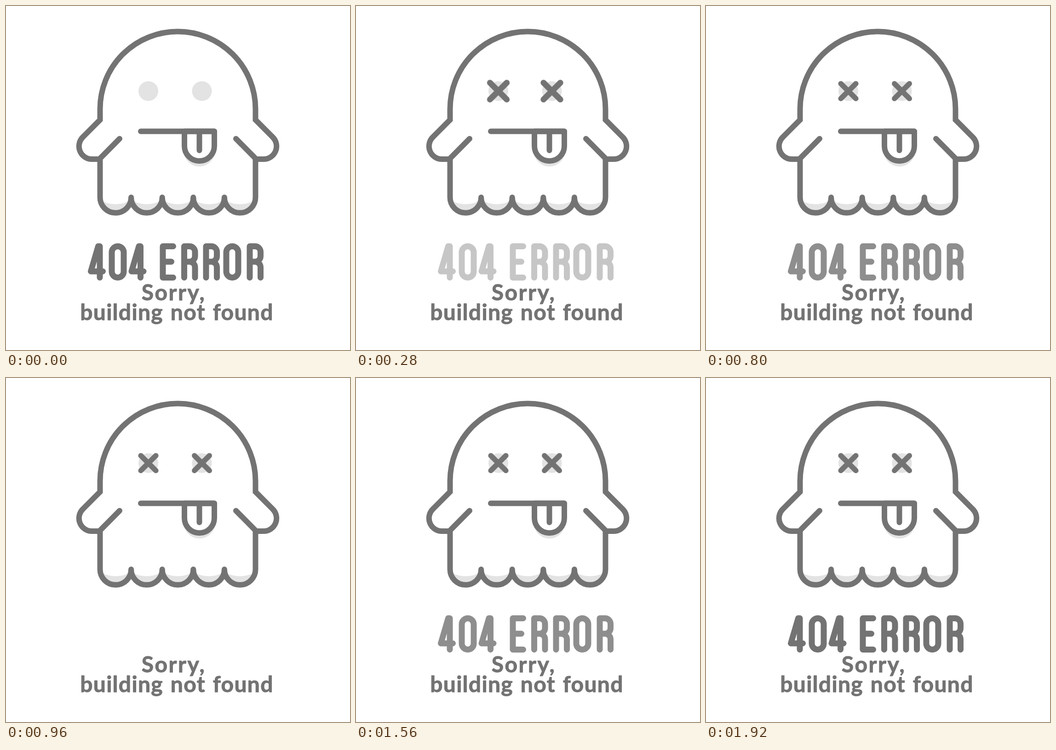
These frames come from a looping animation (748x748 px, 2000 ms). An HTML page:

```html
<!DOCTYPE html>
<html lang="en">
<head>
<meta charset="utf-8">
<title>404 Error</title>
<style>
  html, body { margin: 0; width: 100%; height: 100%; overflow: hidden; background: #fff; }
  svg { display: block; width: 100%; height: 100%; }

  .ink { fill: none; stroke: #737373; stroke-width: 12; stroke-linecap: round; stroke-linejoin: round; }
  .outline { stroke-linejoin: miter; }
  .shade { fill: #e3e3e3; }
  .tongue { fill: #fff; }

  .cross { stroke-width: 11.5; transform-origin: 0 0; animation: pop 2s steps(5) infinite; }
  .heading { stroke-width: 13; animation: blink 2s steps(5) infinite; }

  .note {
    font: 700 48px Lato, sans-serif;
    word-spacing: 3px;
    text-anchor: middle;
    fill: #737373;
    stroke: #737373;
    stroke-width: 1;
    stroke-linejoin: round;
  }

  @keyframes pop {
    0% { transform: scale(0); }
    10% { transform: scale(1.2); }
    20%, 100% { transform: scale(1); }
  }
  @keyframes blink {
    0%, 20%, 38%, 58%, 76%, 96%, 100% { opacity: 1; }
    10%, 48%, 86% { opacity: 0; }
  }
</style>
</head>
<body>
<svg viewBox="0 0 748 748">
  <defs>
    <path id="fold" d="M0 0a33.8 33.8 0 0 0 67.6 0a33.8 15 0 0 1-67.6 0"/>
    <path id="four" d="M26 74.5V6.5H22.5L6.5 61H32.5"/>
    <rect id="oh" x="6.5" y="6.5" width="26" height="68" rx="13"/>
    <path id="e" d="M29 6.5H6.5V74.5H29M6.5 40H25"/>
    <path id="r" d="M6.5 74.5V6.5H18a12 12 0 0 1 12 12v9.5a12 12 0 0 1-12 12H6.5M18 40a12 12 0 0 1 12 12V74.5"/>
  </defs>

  <g class="shade">
    <use href="#fold" x="204.5" y="416"/>
    <use href="#fold" x="272.1" y="416"/>
    <use href="#fold" x="339.7" y="416"/>
    <use href="#fold" x="407.3" y="416"/>
    <use href="#fold" x="474.9" y="416"/>
    <circle cx="420.5" cy="315" r="34"/>
  </g>

  <path class="ink outline" d="M247 288.5L203 333H187.5A28 28 0 0 1 167.7 284.5L204.5 247.5V224A169 168.5 0 0 1 542.5 224V247.5L579.3 284.5A28 28 0 0 1 559.5 333H544L500 288.5"/>
  <path class="ink" d="M204.5 333V416a33.8 33.8 0 0 0 67.6 0a33.8 33.8 0 0 0 67.6 0a33.8 33.8 0 0 0 67.6 0a33.8 33.8 0 0 0 67.6 0a33.8 33.8 0 0 0 67.6 0V333"/>

  <g transform="translate(309.5 185)">
    <circle class="shade" r="21.5"/>
    <path class="ink cross" d="M-16.3-16.3L16.3 16.3M16.3-16.3L-16.3 16.3"/>
  </g>
  <g transform="translate(426 185)">
    <circle class="shade" r="21.5"/>
    <path class="ink cross" d="M-16.3-16.3L16.3 16.3M16.3-16.3L-16.3 16.3"/>
  </g>

  <path class="ink tongue" d="M388 272.5V304.5a32.5 32.5 0 0 0 65 0V272.5Z"/>
  <path class="ink" d="M293 272.5H453M420.5 272.5V314"/>

  <g class="ink heading" role="img" aria-label="404 ERROR">
    <use href="#four" x="178" y="516"/>
    <use href="#oh" x="223.5" y="516"/>
    <use href="#four" x="266.5" y="516"/>
    <use href="#e" x="334.5" y="516"/>
    <use href="#r" x="381" y="516"/>
    <use href="#r" x="428.5" y="516"/>
    <use href="#oh" x="472.5" y="516"/>
    <use href="#r" x="523.5" y="516"/>
  </g>

  <text class="note" x="364.5" y="640" letter-spacing="2.5">Sorry,</text>
  <text class="note" x="371.5" y="683" letter-spacing="1.3">building not found</text>
</svg>
</body>
</html>
```
